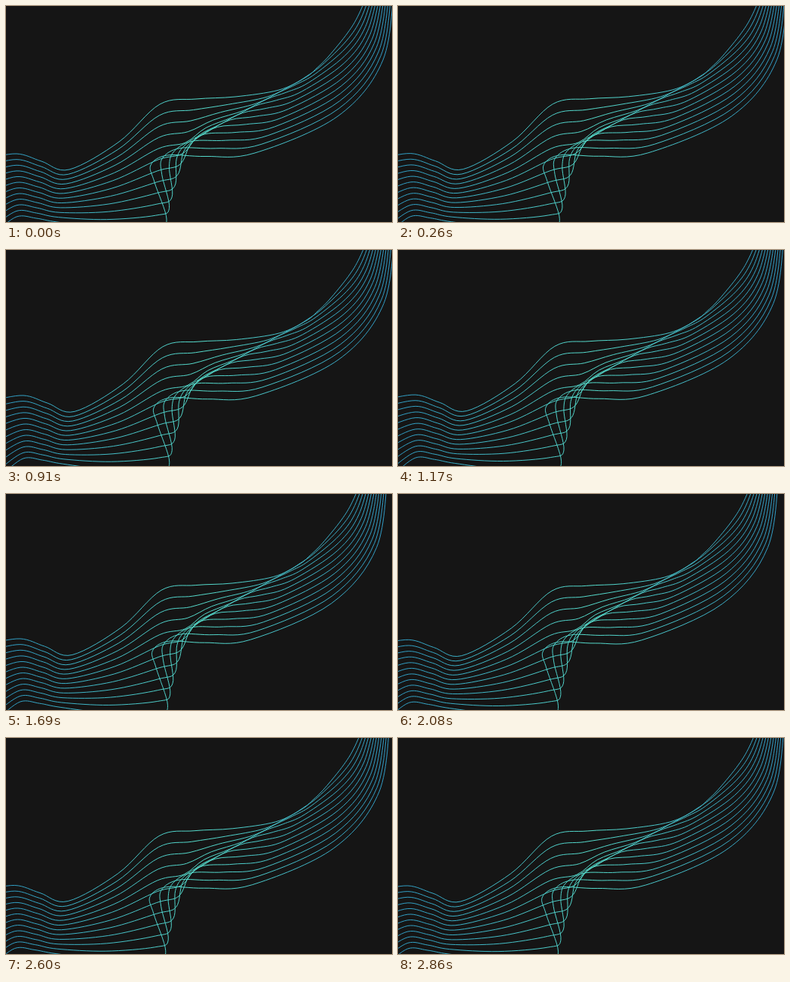
These frames come from a looping animation (512x288 px, 2990 ms). An HTML page with a canvas:

```html
<!DOCTYPE html>
<html>
<head>
<meta charset="utf-8">
<title>Flowing lines</title>
<style>
  html, body { margin: 0; width: 100%; height: 100%; overflow: hidden; background: #151515; }
  canvas { display: block; }
</style>
</head>
<body>
<canvas id="stage" width="512" height="288"></canvas>
<script>
const ctx = document.getElementById('stage').getContext('2d');
const LOOP = 2990, STEP = 130, LINES = 12;

// Key points of the two outer strands; the others are blended between them
const knots = [
  [-28, 204, -14, 302], [14, 197, 14, 281], [47, 207, 40, 283], [84, 218, 68, 288],
  [150, 181, 132, 295], [204, 131, 198, 294], [252, 124, 213, 284], [304, 121, 197, 235],
  [362, 112, 192, 212], [397, 95.5, 214, 199], [412, 83, 265, 200.5], [428, 67, 330, 196],
  [453, 36, 440, 147], [468, 11, 500, 72], [485, -30, 515, -34]
];

const lerp = (a, b, k) => a + (b - a) * k;
const clamp = v => Math.max(0, Math.min(1, v));

// Offset from the starting pose of a sine that crests at the given time
const wave = (time, crest) => {
  const at = t => Math.cos((t - crest) / LOOP * 2 * Math.PI);
  return at(time) - at(0);
};

const color = ctx.createLinearGradient(0, 0, 512, 0);
color.addColorStop(0, '#2f9cc4');
color.addColorStop(0.5, '#56dccb');
color.addColorStop(1, '#2f98c4');

// The left and right ends sway out of phase while the left side lifts
function sway(x, y, time) {
  const left = 6 * clamp(1 - x / 350);
  const right = 6.5 * clamp((x - 200) / 190);
  const lift = 2.2 * (1 - x / 600);
  return [
    x + left * wave(time, 1060) + right * wave(time, 500),
    y - lift * wave(time, 1450)
  ];
}

// Smooth curve through all points
function strand(points) {
  const last = points.length - 1;
  ctx.beginPath();
  ctx.moveTo(...points[0]);
  for (let i = 0; i < last; i++) {
    const a = points[Math.max(0, i - 1)], b = points[i];
    const c = points[i + 1], d = points[Math.min(last, i + 2)];
    ctx.bezierCurveTo(
      b[0] + (c[0] - a[0]) / 6, b[1] + (c[1] - a[1]) / 6,
      c[0] - (d[0] - b[0]) / 6, c[1] - (d[1] - b[1]) / 6,
      ...c);
  }
  ctx.stroke();
}

function draw() {
  const time = Math.floor(performance.now() % LOOP / STEP) * STEP;
  ctx.fillStyle = '#151515';
  ctx.fillRect(0, 0, 512, 288);
  ctx.strokeStyle = color;
  for (let i = 0; i < LINES; i++) {
    const k = i / (LINES - 1);
    strand(knots.map(([ax, ay, bx, by]) => sway(lerp(ax, bx, k), lerp(ay, by, k), time)));
  }
  requestAnimationFrame(draw);
}
draw();
</script>
</body>
</html>
```
